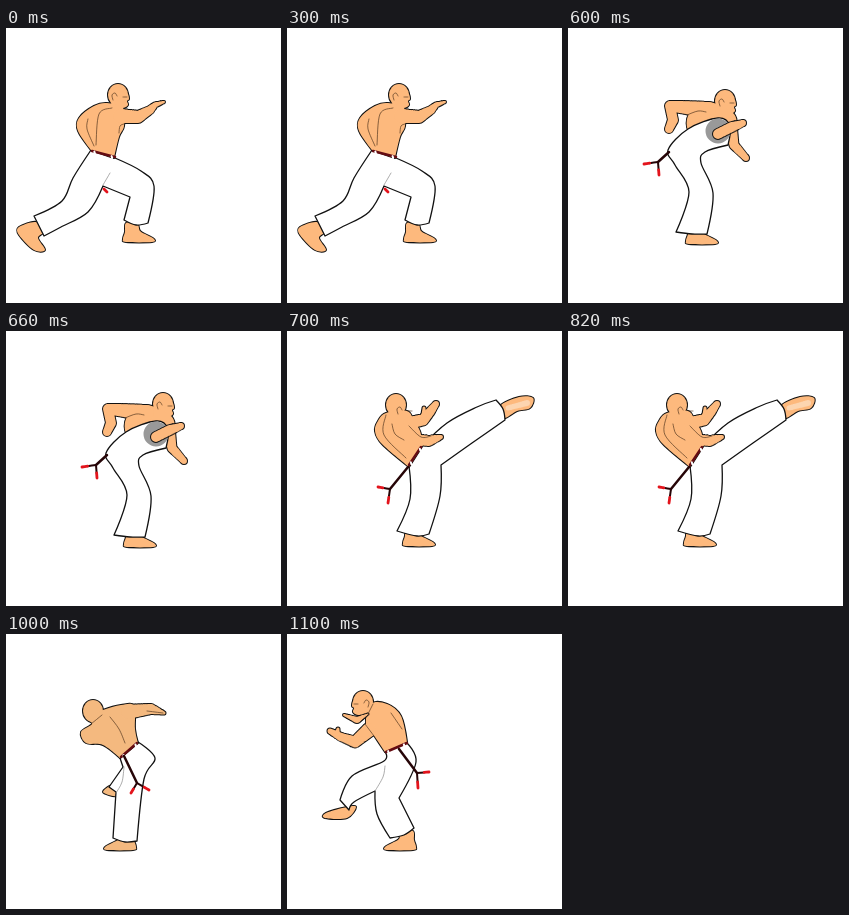
An HTML page with a canvas for the animation above (1200 ms loop, 275 by 275 pixels).

```html
<!DOCTYPE html>
<html lang="en">
<head>
<meta charset="utf-8">
<title>Martial arts kick</title>
<style>
html, body { margin: 0; width: 100%; height: 100%; overflow: hidden; background: #fff; }
canvas { display: block; }
</style>
</head>
<body>
<canvas width="275" height="275"></canvas>
<script>
const LOOP = 1200;
const PEACH = "#fdb97d", TAN = "#f4b97f", INK = "#111", RED = "#e3141c";
const ctx = document.querySelector("canvas").getContext("2d");
ctx.lineJoin = ctx.lineCap = "round";

const numbers = text => text.split(" ").map(p => p.split(",").map(parseFloat));
const mix = (a, b, k) => a.map((v, i) => v + (b[i] - v) * k);

// Smooth curve through key points; a point ending in "!" is a sharp corner.
function curve(text, closed = true) {
  const pts = numbers(text), sharp = text.split(" ").map(p => p.endsWith("!"));
  const n = pts.length, path = new Path2D();
  const index = i => closed ? (i + n) % n : Math.max(0, Math.min(n - 1, i));
  const at = i => pts[index(i)];
  const handle = (i, sign) => {
    const k = sharp[index(i)] ? 0 : sign / 6;
    return at(i).map((v, axis) => v + (at(i + 1)[axis] - at(i - 1)[axis]) * k);
  };
  path.moveTo(...pts[0]);
  for (let i = 0; i < (closed ? n : n - 1); i++) {
    path.bezierCurveTo(...handle(i, 1), ...handle(i + 1, -1), ...at(i + 1));
  }
  if (closed) path.closePath();
  return path;
}

// Tapered limb through joints given as "x,y,radius".
function limb(text) {
  const joints = numbers(text), path = new Path2D();
  for (let i = 1; i < joints.length; i++) {
    for (let k = 0; k <= 1; k += 1 / 32) {
      const [x, y, r] = mix(joints[i - 1], joints[i], k);
      path.moveTo(x + r, y);
      path.arc(x, y, r, 0, 7);
    }
  }
  return path;
}

function placed(path, x, y, dir) {
  const result = new Path2D();
  result.addPath(path, new DOMMatrix([dir, 0, 0, 1, x, y]));
  return result;
}

const FOOT = curve("3,-19 2,-10 0,-3 3,0 29,0 31,-3 24,-7 17,-11 14,-19");
const SKULL = new Path2D();
SKULL.ellipse(0, 0, 10, 11, 0, 0, 7);
const PROFILE = curve("0,-4! 9,-2 11,4 9,6 10,10 5,13 -7,11");
const EAR = curve("-5,5 -6,0 -3,-2 -1,1", false);
const EYE = curve("5,2 9,2", false);

const foot = (heel, ground, dir) => placed(FOOT, heel, ground, dir);
const skull = (x, y) => placed(SKULL, x, y, 1);
const profile = (x, y, dir) => placed(PROFILE, x, y, dir);

function ink(path, color, width) {
  ctx.strokeStyle = color;
  ctx.lineWidth = width;
  ctx.stroke(path);
}

// Shapes merge into one silhouette: all outlines first, then all fills.
function blend(color, ...shapes) {
  shapes.forEach(s => ink(s, INK, 2));
  ctx.fillStyle = color;
  shapes.forEach(s => ctx.fill(s));
}

function face(x, y, dir) {
  for (const mark of [EAR, EYE]) ink(placed(mark, x, y, dir), "#553820", .7);
}

function cloth(text) {
  const path = curve(text);
  ctx.fillStyle = "#fff";
  ctx.fill(path);
  ink(path, INK, 1.3);
}

const stroke = (text, color, width) => ink(curve(text, false), color, width);
const muscle = (...lines) => lines.forEach(t => stroke(t, "#553820", .7));
const fold = text => stroke(text, "#888", .7);
const tip = text => stroke(text, RED, 2.8);

function belt(text) {
  stroke(text, "#650c12", 2.5);
  const [a, b] = numbers(text);
  for (const k of [.1, .85]) {
    const [x, y] = mix(a, b, k);
    stroke(`${x},${y} ${x + .6},${y + 2}`, "#fff", 2);
  }
}

// Hanging cord that forks at a knot into two red-tipped ends.
function cord(start, knot, ...ends) {
  stroke(`${start} ${knot}`, "#260507", 2.5);
  const [from] = numbers(knot);
  for (const end of ends) {
    const middle = mix(from, numbers(end)[0], .6);
    stroke(`${knot} ${middle}`, "#260507", 2);
    tip(`${middle} ${end}`);
  }
}

function lunge() {
  blend(PEACH, foot(117, 214, 1), curve("30,194 13,199 13,207 28,222 39,222 32,210 37,204"));
  cloth("85,122! 109,130! 135,143 148,158 142,195! 130,197 118,192! 124,169! 97,158! 82,184 55,199 38,208! 28,188! 56,173 67,150");
  blend(PEACH, skull(112, 67), profile(112, 67, 1),
    curve("101,75 117,80 118,98 113,109 108,130! 85,122! 72,103 73,90 88,78"),
    limb("114,88,7 132,89,6 144,82,4 149,77,2.5 158,74,1"));
  face(112, 67, 1);
  muscle("106,80 93,86 90,117", "82,91 81,101 88,118", "118,96 114,98 113,105");
  fold("97,157 104,145");
  belt("86,123 109,129");
  tip("98,161 101,164");
}

function guard() {
  blend(PEACH, foot(117, 215, 1), curve("33,200 27,223! 44,224 40,215 42,204"));
  cloth("77,125! 109,135! 135,150 149,166 144,207! 132,208 118,204! 123,179! 100,164 82,160! 64,180 50,208! 40,205 29,193! 52,162");
  blend(PEACH, skull(112, 73), profile(112, 73, 1),
    curve("101,80 121,88 122,100 112,112 108,136! 77,126! 79,118 74,104 76,93 90,87"),
    limb("112,98,6 128,92,5 135,90,2"),
    limb("118,100,6 128,106,5 141,116,3 152,119,2"));
  face(112, 73, 1);
  muscle("79,120 101,112 132,96", "91,100 118,92 125,87", "100,113 97,124");
  belt("77,126 108,135");
  cord("102,166", "101,170", "94,178");
  tip("109,171 112,174");
}

function spin() {
  blend(PEACH, foot(118, 216, 1), skull(157, 73), profile(157, 73, 1),
    curve("121,86 140,74 166,86 165,105 140,112 121,104"),
    limb("140,82,8 112,79,6 102,78,5 105,92,5 101,101,4"),
    limb("163,100,6 166,117,4.5 178,130,3"));
  face(157, 73, 1);
  muscle("119,87 130,83 138,84");
  cloth("100,122 120,101 150,90 162,98 160,117! 137,124 133,135 145,165 139,206! 124,206 108,204! 121,164 107,137");
  ctx.fillStyle = "#999";
  ctx.fill(limb("150,103,12.5 150,103,12.5"));
  blend(PEACH, limb("150,106,5 164,99,5 175,95,3"));
  cord("101,124", "90,134", "76,136", "91,147");
}

function highKick() {
  blend(PEACH, foot(116, 215, 1), curve("213,75 232,66 246,67 243,77 230,80 217,87"));
  ctx.fillStyle = "#fcd5b0";
  ctx.fill(limb("221,77,2.5 240,72,3"));
  cloth("134,116! 160,92 190,76 209,69! 216,78 218,89! 185,112 154,134! 153,165 142,203! 130,205 110,200! 123,168 122,135!");
  blend(PEACH, skull(109, 74),
    curve("99,82 120,80 127,90 133,100 136,114! 122,136! 95,113 88,100 91,90"),
    limb("122,92,6 136,89,5.5 143,81,4.5 149,73,3"), limb("137,86,3 137,77,1.5"),
    limb("130,109,5 142,110,5 154,106,2"));
  face(116, 78, 1);
  muscle("99,84 97,104 119,127", "105,93 108,103 117,109", "122,95 134,106 144,105");
  belt("134,116 122,134");
  cord("121,136", "103,158", "91,156", "101,172");
}

function foldLeg() {
  blend(TAN, foot(130, 216, -1));
  cloth("115,131! 135,116! 165,101 180,99 185,105 175,122 148,141 132,165 129,206! 118,208 104,203! 104,165");
  blend(TAN, skull(96, 78),
    curve("88,86 106,80 116,74 128,76 128,92 134,115! 115,131! 97,119 85,115 80,103 82,93"),
    limb("122,84,7.5 140,89,5.5 162,97,3 180,100,1.5"), limb("128,80,4 136,76,3"),
    limb("182,103,4 186,102,4"));
  muscle("99,91 121,121", "88,85 95,83 100,79");
  belt("134,114 117,130");
  cord("116,131", "96,155", "84,153", "94,170");
}

function lowerLeg() {
  blend(TAN, foot(130, 216, -1), curve("107,151 97,158 110,162"));
  cloth("114,124! 132,108! 149,124 138,145 131,207! 119,208 107,204! 110,158! 103,153! 117,133!");
  blend(TAN, skull(87, 77),
    curve("82,84 97,76 115,71 128,72 129,95 132,109! 114,124! 97,111 80,109 75,98 86,90"),
    limb("122,78,7 145,75,5 158,79,1.5"));
  muscle("104,83 113,95 119,109", "85,90 96,81", "141,77 157,79");
  fold("118,133 116,148 110,159");
  belt("131,109 115,123");
  cord("118,122", "131,149", "143,156", "125,159");
}

function stepBack() {
  blend(PEACH, foot(129, 216, -1), curve("60,173 39,179 38,184 60,184 69,173"));
  cloth("98,118! 120,109! 129,128 112,164! 127,194! 117,201 103,204! 90,180 88,157! 67,168 62,176! 53,166! 65,142 97,127");
  blend(PEACH, skull(76, 68), profile(76, 68, -1),
    curve("84,70 100,70 114,82 120,108! 98,118! 88,103 79,90"),
    limb("82,96,7 68,108,5.5 54,103,4 43,97,2.5"), limb("50,101,3 51,95,1.5"));
  face(76, 68, -1);
  blend(PEACH, limb("57,81,1 70,86,3 81,80,.5"));
  muscle("86,70 81,80", "78,90 87,102", "104,79 115,95");
  fold("98,132 96,143 88,157");
  belt("99,118 120,109");
  cord("112,115", "130,139", "142,138", "131,154");
}

const poses = [
  [0, lunge], [500, guard], [600, spin], [700, highKick],
  [900, foldLeg], [1000, lowerLeg], [1100, stepBack]
];

function render() {
  const t = performance.now() % LOOP;
  ctx.fillStyle = "#fff";
  ctx.fillRect(0, 0, 275, 275);
  poses.findLast(([start]) => start <= t)[1]();
  requestAnimationFrame(render);
}
render();
</script>
</body>
</html>
```
